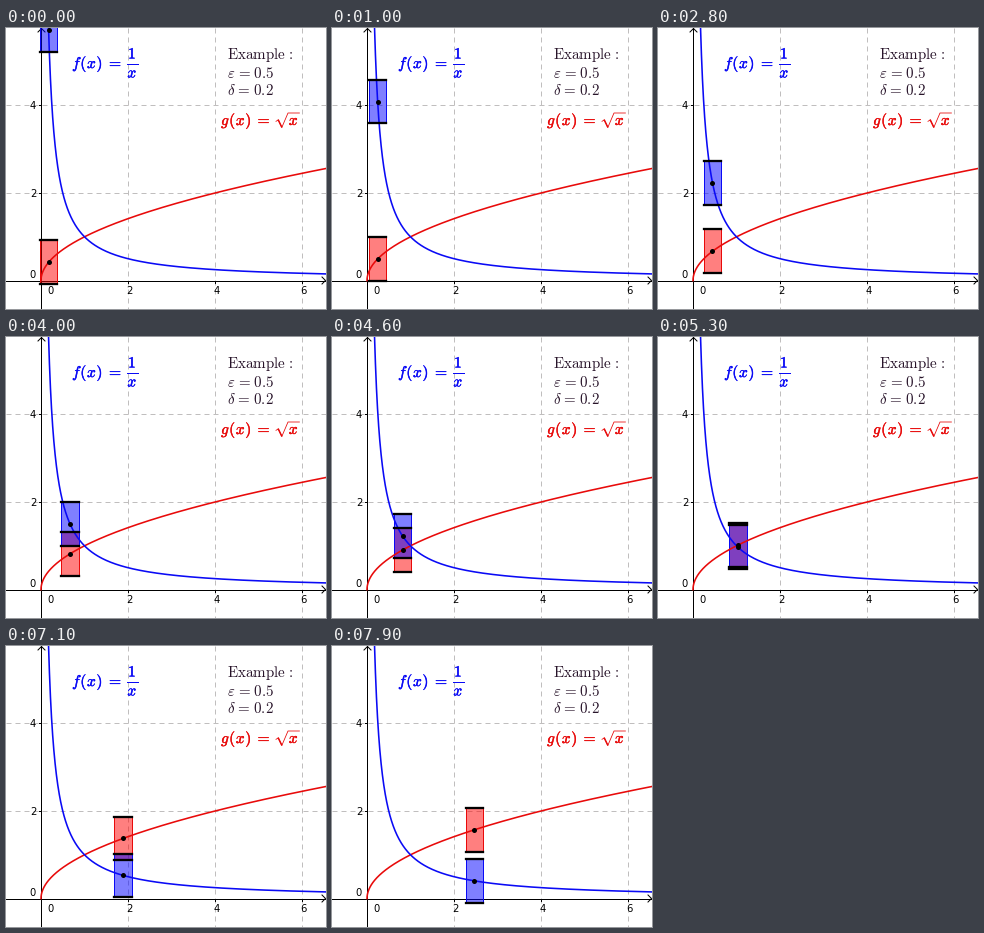
A matplotlib script for the animation above (8000 ms loop, 320 by 281 pixels).

```python
import matplotlib.pyplot as plt
import numpy as np
from matplotlib.animation import FuncAnimation
from matplotlib.patches import Rectangle
from matplotlib.patheffects import withStroke

W, H, DPI = 320, 281, 64
FRAMES, STEP = 80, 100
X0, Y0, SX, SY = 35.0, 252.6, 43.5, 43.8
EPS, DELTA = 0.5, 0.2
START, RATE = 0.175, 0.0335
BLUE, RED, INK, GRID = "#0a0af5", "#e80a0a", "#28142a", "#c0bebe"

plt.rcParams["mathtext.fontset"] = "cm"
plt.rcParams["font.family"] = "DejaVu Sans"

fig = plt.figure(figsize=(W / DPI, H / DPI), dpi=DPI, facecolor="white")
ax = fig.add_axes([0, 0, 1, 1])
ax.set_xlim(0, W)
ax.set_ylim(H, 0)
ax.axis("off")


def pt(px):
    return px * 72 / DPI


def sx(x):
    return X0 + SX * x


def sy(y):
    return Y0 - SY * y


def line(xs, ys, color="black", width=1, z=2, **kw):
    return ax.plot(xs, ys, color=color, lw=pt(width), zorder=z, **kw)[0]


def text(x, y, s, size=15, color=INK, bold=0, **kw):
    label = ax.text(x, y, s, fontsize=pt(size), color=color, va="baseline",
                    zorder=2, **kw)
    if bold:
        label.set_path_effects([withStroke(linewidth=pt(bold), foreground=color)])


def bold_math(x, y, s, color):
    text(x, y, f"${s}$", 15.5, color, bold=0.4)


def draw_plane():
    dash = dict(color=GRID, z=0, linestyle=(0, (5, 4)), dash_capstyle="butt")
    for v in (2, 4, 6):
        line([sx(v)] * 2, [0, H], **dash)
        line([sx(v)] * 2, [Y0, Y0 + 2.5], z=1)
        text(sx(v) + 1.5, 266.5, str(v), 10, "black", ha="center")
    for v in (2, 4):
        line([0, W], [sy(v)] * 2, **dash)
        line([X0 - 2.5, X0], [sy(v)] * 2, z=1)
        text(27, sy(v) + 4, str(v), 10, "black", ha="center")
    text(44, 266.5, "0", 10, "black", ha="center")
    text(27, 250, "0", 10, "black", ha="center")
    line([0, W], [Y0, Y0], z=1)
    line([X0, X0], [0, H], z=1)
    cx, cy = X0 + 0.5, Y0 - 0.1
    line([W - 4, W - 0.5, W - 4], [cy - 3.5, cy, cy + 3.5], z=1)
    line([cx - 3.5, cx, cx + 3.5], [4, 0.5, 4], z=1)


def draw_labels():
    gap = r"\hspace{0.11}"
    text(221.2, 31.5, rf"$\mathrm{{Example}}{gap}\mathrm{{:}}$")
    text(221.2, 50.3, rf"$\varepsilon{gap}={gap}0.5$")
    text(221.2, 67, rf"$\delta{gap}={gap}0.2$")

    thin = r"\hspace{0.05}"
    call = f"{thin}({thin}x{thin})"
    bold_math(66, 40, "f" + call, BLUE)
    bold_math(100.3, 40, "=", BLUE)
    bold_math(122, 30.5, "1", BLUE)
    line([120.6, 131.5], [36, 36], BLUE, 1)
    bold_math(121.4, 49.5, "x", BLUE)

    bold_math(215, 97, "g" + call, RED)
    bold_math(248.8, 97, "=", RED)
    line([270, 272.3, 275.8, 282, 293.4], [93.3, 92, 99.5, 85, 85], RED, 0.8)
    line([272.4, 275.6], [92.2, 98.8], RED, 1.5)
    bold_math(282.8, 97, "x", RED)


class Window:
    """Box of size 2*DELTA by 2*EPS that rides along a curve."""

    def __init__(self, func, color, rgb, z):
        self.func = func
        self.box = Rectangle((0, 0), 2 * DELTA * SX, 2 * EPS * SY, lw=pt(1),
                             fc=(*rgb, 0.5), ec=color, zorder=z)
        ax.add_patch(self.box)
        self.bars = [line([], [], width=2.3, z=6) for _ in range(2)]
        self.dot = line([], [], z=7, marker="o", ms=pt(5), mew=0, snap=False)

    def move(self, x):
        y = self.func(x)
        left, right = sx(x - DELTA), sx(x + DELTA)
        self.box.set_xy((left, sy(y + EPS)))
        for bar, edge in zip(self.bars, (y - EPS, y + EPS)):
            bar.set_data([left, right], [sy(edge)] * 2)
        self.dot.set_data([sx(x)], [sy(y)])
        return [self.box, *self.bars, self.dot]


def recip(x):
    return 1 / x


draw_plane()
draw_labels()
xf = np.geomspace(0.15, 6.7, 400)
xg = np.linspace(0, 2.6, 300) ** 2
line(sx(xg), sy(np.sqrt(xg)), RED, 1.6, z=5)
line(sx(xf), sy(recip(xf)), BLUE, 1.6, z=5)

windows = [Window(np.sqrt, RED, (1, 0, 0), 3),
           Window(recip, BLUE, (0, 0, 1), 4)]


def update(n):
    x = START * np.exp(RATE * n)
    return [a for w in windows for a in w.move(x)]


anim = FuncAnimation(fig, update, frames=FRAMES, interval=STEP,
                     init_func=lambda: update(0), repeat=True, repeat_delay=0)
plt.show()
```
